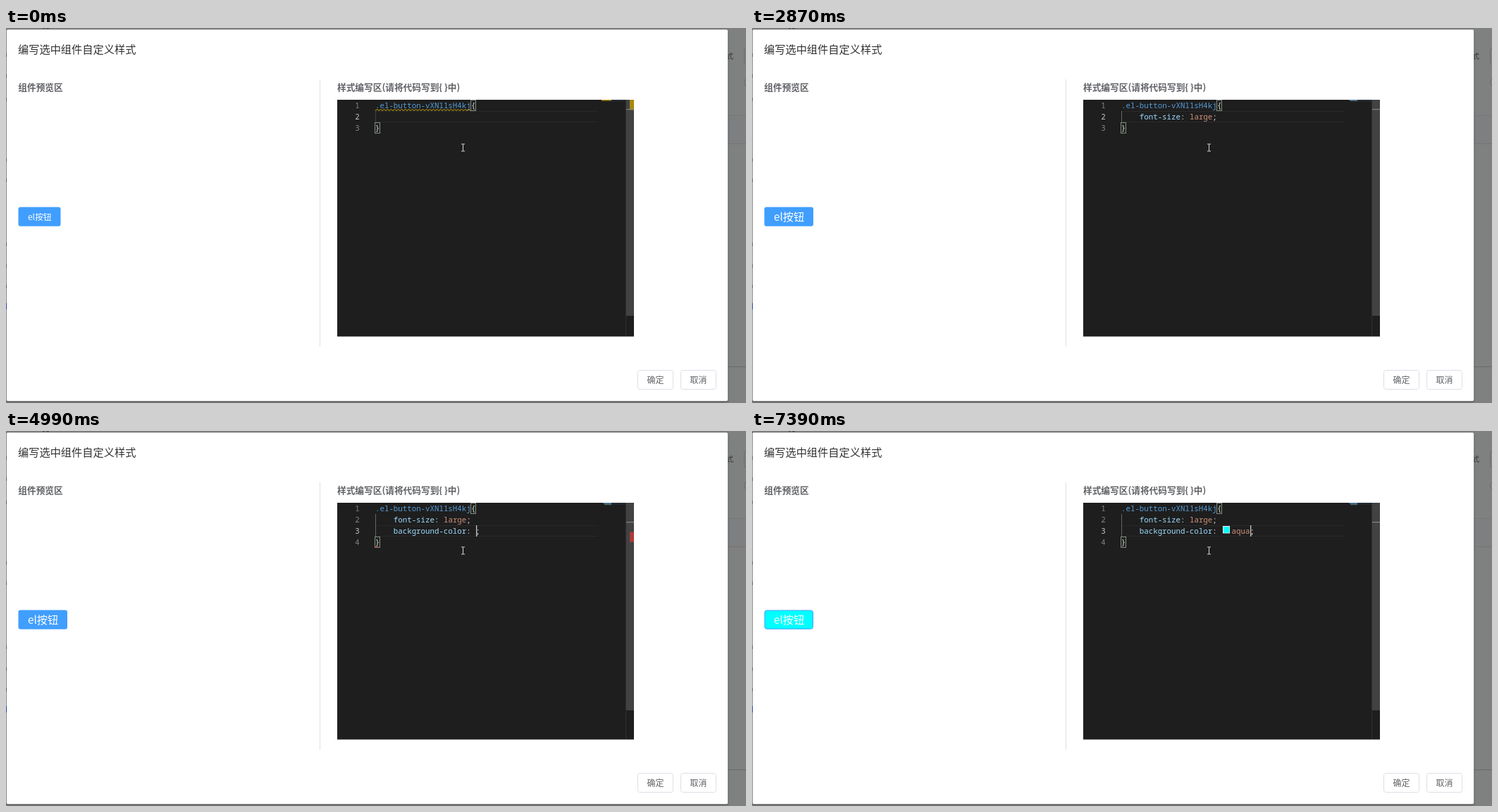
Write an HTML page with a canvas that moves like this. It is 1050 by 533 pixels and loops after 7.62 s.

```html
<!DOCTYPE html>
<html lang="zh">
<head>
<meta charset="utf-8">
<style>
html, body { margin: 0; width: 100%; height: 100%; overflow: hidden; background: #7f8080; }
canvas { display: block; }
</style>
</head>
<body>
<canvas id="stage" width="1050" height="533"></canvas>
<script>
const ctx = document.getElementById('stage').getContext('2d');
const LOOP = 7620, CHAR = 6.47, ROW = 16.05, TOP = 102, LEFT = 549.8;
const SANS = '"Noto Sans CJK SC", "Noto Sans CJK", sans-serif';
const MONO = '10.78px "Noto Sans Mono", monospace';

// Suggestion lists: icon kind, highlighted prefix length, slider height, entries
const list = (icon, hit, bar, names) => ({ icon, hit, bar, names: names.split(' ') });
const F = list('wrench', 1, 24, 'font-size font-family font-weight float font-style flex font filter fill flex-direction flex-flow font-variant');
const FO = list('wrench', 2, 38, 'font-size font-family font-weight font-style font font-variant font-display font-feature-settings font-stretch font-variant-ligatures font-kerning font-language-override');
const SIZES = list('value', 0, 78, 'large larger medium small smaller x-large x-small xx-large xx-small 0% 0ch 0cm');
const B = list('wrench', 1, 0, 'border background-color background box-sizing border-radius bottom box-shadow background-image border-bottom background-position border-top border-color');
const BA = list('wrench', 2, 100, 'background-color background background-image background-position background-size background-repeat background-clip background-attachment background-origin backface-visibility background-position-x background-position-y');
const COLORS = list('color', 0, 17, 'aliceblue antiquewhite aqua aquamarine azure beige bisque black blanchedalmond blue blueviolet brown');

// err: 1 marks the closing brace, 2 marks the semicolon
const steps = [
  [0, { line: 2, text: '', col: 0, caret: 0, warn: 1, err: 0, list: null, sel: 0, bar: 1, big: 0, aqua: 0, swatch: 0 }],
  [70, { caret: 1 }],
  [550, { caret: 0 }],
  [720, { text: 'f', col: 1, caret: 1 }],
  [810, { list: F }],
  [1050, { text: 'fo', col: 2, list: FO }],
  [1530, { caret: 0, warn: 0, err: 1 }],
  [1690, { text: 'font-size: ;', col: 11, caret: 1, list: null }],
  [1790, { list: SIZES }],
  [2160, { caret: 0, err: 2 }],
  [2380, { text: 'font-size: large;', col: 16, caret: 1, list: null }],
  [2470, { big: 1 }],
  [2870, { caret: 0, err: 0 }],
  [3190, { col: 17, caret: 1 }],
  [3490, { line: 3, text: '', col: 0 }],
  [3970, { caret: 0 }],
  [4280, { text: 'b', col: 1, caret: 1, list: B, bar: 0 }],
  [4360, { bar: 1 }],
  [4430, { text: 'ba', col: 2, list: BA }],
  [4910, { caret: 0, err: 1 }],
  [4990, { text: 'background-color: ;', col: 18, caret: 1, list: null }],
  [5080, { list: COLORS }],
  [5450, { caret: 0, err: 2 }],
  [5750, { sel: 1 }],
  [5910, { sel: 2 }],
  [5990, { caret: 1 }],
  [6380, { text: 'background-color: aqua;', col: 22, list: null }],
  [6460, { aqua: 1 }],
  [6850, { caret: 0 }],
  [6930, { err: 0 }],
  [7390, { caret: 1, swatch: 1 }]
];
const stateAt = t => Object.assign({}, ...steps.filter(s => s[0] <= t).map(s => s[1]));

function box(x, y, w, h, fill) {
  ctx.fillStyle = fill;
  ctx.fillRect(x, y, w, h);
}
function round(x, y, w, h, r, fill, stroke) {
  ctx.beginPath();
  ctx.roundRect(x, y, w, h, r);
  if (fill) { ctx.fillStyle = fill; ctx.fill(); }
  if (stroke) { ctx.strokeStyle = stroke; ctx.lineWidth = 1; ctx.stroke(); }
}
function label(str, x, mid, size, color, weight = 400) {
  ctx.font = `${weight} ${size}px ${SANS}`;
  ctx.fillStyle = color;
  ctx.fillText(str, x, mid + size * 0.37);
}
function mono(str, x, top, color) {
  ctx.font = MONO;
  ctx.fillStyle = color;
  ctx.fillText(str, x, top + 11.5);
}
function path(points, color, width) {
  ctx.beginPath();
  for (let i = 0; i < points.length; i += 2) ctx.lineTo(points[i], points[i + 1]);
  ctx.strokeStyle = color;
  ctx.lineWidth = width;
  ctx.stroke();
}
const lineTop = n => TOP + (n - 1) * ROW;

function squiggle(x, end, y, color) {
  const pts = [];
  for (let i = 0; x + i * 2.5 <= end + 1; i++) pts.push(x + i * 2.5, y + (i % 2 ? -1 : 1));
  path(pts, color, 1);
}

function backdrop() {
  box(0, 0, 1050, 533, '#7f8080');
  box(1024, 124, 26, 1, '#777879');
  box(1024, 125, 26, 39, '#7d7f80');
  box(1024, 164, 26, 1, '#777374');
  box(1024, 481, 26, 1, '#696a6b');
  label('式', 1022, 40, 10, '#333');
  round(1047.5, 28.5, 20, 23, 3, null, '#6b6c6e');
  round(1047.5, 70.5, 14, 14, 7, null, '#6b6c6e');
  box(52, 0, 3, 1, '#444');
  box(57, 0, 4, 1, '#444');
  ctx.save();
  ctx.shadowColor = 'rgba(0,0,0,.45)';
  ctx.shadowBlur = 3;
  ctx.shadowOffsetY = 1;
  round(0.8, 2.3, 1023.4, 528, 2, '#fff');
  ctx.restore();
  for (const y of [36, 66, 99, 185, 214, 305, 336, 365]) box(0, y, 1, 5, '#555');
  box(0, 391, 1, 9, '#2a3c9a');
}

function dialog(s) {
  label('编写选中组件自定义样式', 17, 30.5, 15.23, '#303133');
  label('组件预览区', 17.3, 84, 12.7, '#606266', 700);
  label('样式编写区(请将代码写到{ }中)', 470, 84, 12.7, '#606266', 700);
  box(445, 73, 1, 380, '#dfe1e6');
  if (s.aqua) round(18, 255, 68.5, 26.3, 3, '#0ff', '#409eff');
  else round(17.5, 254.5, s.big ? 69.5 : 60, 27.3, 3, '#409eff');
  label('el按钮', 31, 268.5, s.big ? 15.23 : 11.85, '#fff', 500);
  [[896.5, '确定'], [957.5, '取消']].forEach(([x, str]) => {
    round(x, 486.5, 50, 27, 3, '#fff', '#dcdfe6');
    label(str, x + 13, 500.3, 12, '#606266');
  });
}

function brace(ch, x, n) {
  const y = lineTop(n);
  box(x, y, 7, 15.5, '#1c251c');
  ctx.strokeStyle = '#888';
  ctx.lineWidth = 1;
  ctx.strokeRect(Math.round(x) - 0.5, Math.round(y) + 0.5, 7, 15);
  mono(ch, x, y, '#dcdcdc');
}

function codeLine(str, n, swatch) {
  const y = lineTop(n);
  const [, prop, colon, value, end] = str.match(/^([\w-]*)(:?) ?(\w*)(;?)/);
  const put = (part, col, color, dx = 0) => mono(part, LEFT + col * CHAR + dx, y, color);
  const at = prop.length + 2, dx = swatch ? 14.3 : 0;
  put(prop, 0, '#9cdcfe');
  put(colon, prop.length, '#d4d4d4');
  put(value, at, '#ce9178', dx);
  put(end, at + value.length, '#d4d4d4', dx);
  if (swatch) {
    box(668, 135, 10, 10.5, '#eee');
    box(669, 136, 8.2, 8.7, '#0ff');
  }
}

function minimap(s) {
  if (s.warn) box(845, 102, 14, 1.5, '#a8880f');
  else box(847, 102, 12, 1, '#3f6d8c');
  box(859, 103, 21, 1, '#243a46');
  if (s.text || s.line > 2) box(849, 103, s.line > 2 || s.text.length > 9 ? 10 : 3, 1, '#4d6f7c');
  if (s.line > 2 && s.text) box(849, 104.2, Math.min(10, 1 + s.text.length / 2), 1, '#4d6f7c');
}

function ruler(s) {
  box(879, TOP, 1, 336, '#303030');
  box(880, TOP, 11, (s.line > 2 ? 397 : 409) - TOP, '#424242');
  if (s.warn) box(885, TOP, 6, 14.5, '#a8880f');
  const mark = TOP + (s.line - 1) * 13.7;
  if (s.err) box(885, mark + (s.err === 1 ? 14 : 0.5), 6, 14.5, '#ad3a3a');
  box(880, Math.round(mark - 0.5), 11, 1.2, '#85857f');
}

function editor(s) {
  box(470, TOP, 421, 336.5, '#1e1e1e');
  const cur = lineTop(s.line), last = s.line + 1;
  box(524, Math.round(cur), 316, 1, '#2a2a2a');
  box(524, Math.round(cur + 15), 316, 1, '#2a2a2a');
  const lit = s.text || s.line > 2;
  box(524, 118, 1, (s.line - 1) * ROW, lit ? '#666' : '#404040');
  for (let n = 1; n <= last; n++) mono(n, 495.3, lineTop(n), n === s.line ? '#c6c6c6' : '#858585');
  mono('.el-button-vXNl1sH4kj', 524, TOP, '#569cd6');
  brace('{', 660, 1);
  brace('}', 523.8, last);
  if (s.line > 2) codeLine('font-size: large;', 2);
  codeLine(s.text, s.line, s.swatch);
  if (s.warn) squiggle(524, 660, 116.5, '#cca700');
  if (s.err === 1) squiggle(524, 529, lineTop(last) + 14.5, '#f14c4c');
  if (s.err === 2) {
    const x = LEFT + (s.text.length - 1) * CHAR;
    squiggle(x, x + 5, cur + 14.5, '#f14c4c');
  }
  minimap(s);
  ruler(s);
  if (s.caret) box(Math.round(550.2 + s.col * CHAR + (s.swatch ? 14.3 : 0)), Math.round(cur), 1.3, 16, '#c8c9c7');
}

function wrench(x, y) {
  const c = '#c5c5c5';
  ctx.lineCap = 'round';
  path([x + 1.8, y + 10.3, x + 6.6, y + 5.5], c, 3.6);
  path([x + 1.8, y + 10.3, x + 6.6, y + 5.5], '#252526', 1.5);
  ctx.lineCap = 'butt';
  ctx.beginPath();
  ctx.arc(x + 8.3, y + 3.9, 3.1, -0.3, 4.9);
  ctx.strokeStyle = c;
  ctx.lineWidth = 1.1;
  ctx.stroke();
  path([x + 11.2, y + 3, x + 9, y + 4.4, x + 7.8, y + 3.2, x + 9, y + 0.9], c, 1.1);
}
function valueIcon(x, y, color) {
  const frame = (a, b, w, h) => {
    box(a, b, w, h, '#252526');
    ctx.strokeStyle = color;
    ctx.lineWidth = 1.2;
    ctx.strokeRect(a, b, w, h);
    path([a + 2, b + h / 2, a + w - 2, b + h / 2], color, 1);
  };
  frame(x + 4.5, y + 1.5, 6.5, 5);
  frame(x + 0.6, y + 5.3, 6.5, 5);
}
function unitIcon(x, y) {
  const c = '#c5c5c5';
  ctx.strokeStyle = c;
  ctx.lineWidth = 1.2;
  ctx.strokeRect(x + 2, y + 0.8, 7, 10.4);
  for (const d of [3.4, 6, 8.6]) path([x + 2, y + d, x + 5.5, y + d], c, 1);
}

function popup(s) {
  const { icon, hit, bar, names } = s.list;
  const exact = LEFT + s.col * CHAR, x = Math.floor(exact + 0.2), y = Math.floor(lineTop(s.line + 1));
  const covers = x < 648;
  box(x, y, 362, 193.5, '#454545');
  box(x + 1, y + 1, 360, 191.5, '#252526');
  names.forEach((name, i) => {
    const top = y + 0.5 + i * ROW, tx = exact + 19.3;
    if (i === s.sel) box(x + 1, Math.round(top), 360, 16, '#094771');
    else if (covers && i === 4 - s.line) box(x + 1, Math.round(top), 360, 16, '#2a2d2e');
    if (icon === 'wrench') wrench(x + 3, top + 2);
    else if (icon === 'color') {
      box(x + 6, top + 4.8, 8.3, 8.3, '#eee');
      box(x + 6.8, top + 5.6, 6.7, 6.7, name);
    } else if (name[0] === '0') unitIcon(x + 3, top + 2.2);
    else valueIcon(x + 3, top + 2.2, i === s.sel ? '#d8d8d8' : '#e0932a');
    mono(name, tx, top, '#d4d4d4');
    if (hit) {
      const w = hit * CHAR;
      box(tx - 0.5, top + 1, w + 0.5, 14, i === s.sel ? '#094771' : covers && i === 4 - s.line ? '#2a2d2e' : '#252526');
      ctx.font = 'bold ' + MONO;
      ctx.fillStyle = '#0097fb';
      ctx.fillText(name.slice(0, hit), tx, top + 11.5);
    }
  });
  if (s.bar) box(x + 352.5, y + 1, 8.5, bar || 17, 'rgba(121,121,121,.4)');
  return covers;
}

function beam() {
  const c = '#d8d8d8';
  path([648.5, 165.5, 648.5, 174.5], c, 1);
  path([646, 165, 651, 165], c, 1);
  path([646, 175, 651, 175], c, 1);
}
function hand() {
  ctx.beginPath();
  [646, 169, 647.2, 168.3, 648.4, 169, 648.8, 173, 651, 173, 653, 173.8, 654.6, 175, 654.6, 179.5, 653, 184.5, 647.5, 184.5,
    643.5, 178.5, 644, 177, 646, 178].forEach((v, i, p) => { if (i % 2) ctx.lineTo(p[i - 1], v); });
  ctx.closePath();
  ctx.fillStyle = '#fff';
  ctx.strokeStyle = '#111';
  ctx.lineWidth = 1;
  ctx.lineJoin = 'round';
  ctx.fill();
  ctx.stroke();
  ctx.lineJoin = 'miter';
}

function draw(now) {
  const s = stateAt(now % LOOP);
  backdrop();
  dialog(s);
  editor(s);
  if (s.list && popup(s)) hand();
  else beam();
  requestAnimationFrame(draw);
}
requestAnimationFrame(draw);
</script>
</body>
</html>
```
